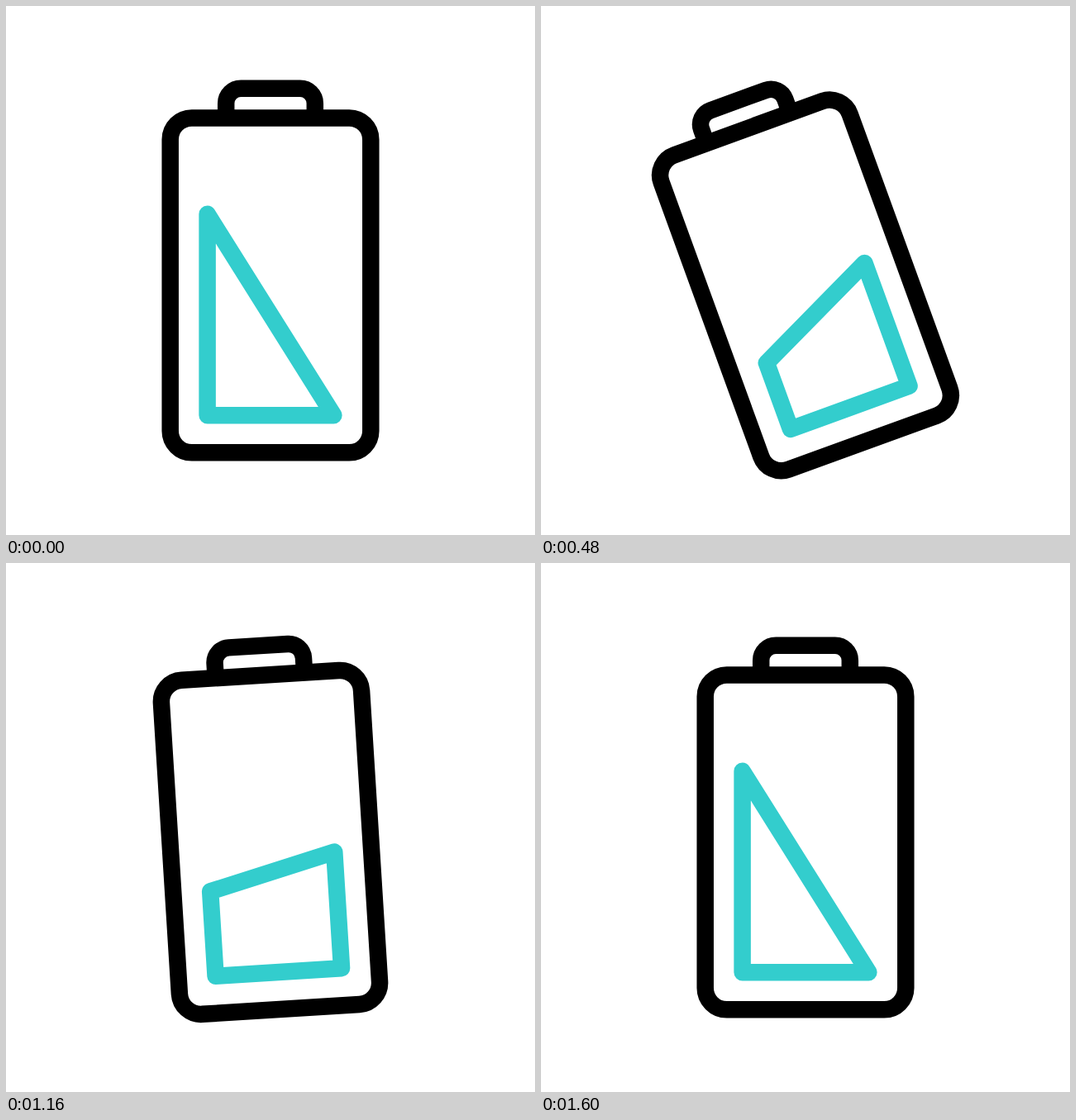
Animation, 640 px wide and 640 px high, one loop 1620 ms. Source, as an HTML page:

```html
<!DOCTYPE html>
<html lang="en">
<head>
<meta charset="utf-8">
<title>Battery</title>
<style>
  html, body { margin: 0; width: 100%; height: 100%; overflow: hidden; background: #fff; }
  svg { display: block; width: 100%; height: 100%; }
  path, rect { fill: none; stroke: #000; stroke-width: 20.5; }
  #liquid { stroke: #33cdcd; stroke-linejoin: round; }
</style>
</head>
<body>
<svg viewBox="0 0 640 640">
  <g id="battery">
    <path d="M266.2 130V117.7a18 18 0 0 1 18-18h71.6a18 18 0 0 1 18 18V130"/>
    <rect x="198.7" y="135.5" width="242.6" height="404.8" rx="26"/>
    <path id="liquid"/>
  </g>
</svg>
<script>
const LOOP = 1620;
const battery = document.getElementById('battery');
const liquid = document.getElementById('liquid');

// [time in ms, value]
const tilt = [[0, 0], [115, 0], [484, -20], [786, 5], [1278, -5], [1600, 0]];
const slosh = [[0, 1], [800, 0], [1607, 1]];

function valueAt(keys, t) {
  for (let i = 1; i < keys.length; i++) {
    const [t0, a] = keys[i - 1], [t1, b] = keys[i];
    if (t < t1) {
      const x = (t - t0) / (t1 - t0);
      return a + (b - a) * x * x * (3 - 2 * x);
    }
  }
  return keys[keys.length - 1][1];
}

function draw(t) {
  const left = 243.6, right = 396.4, floor = 495.3, rise = 243.5;
  const s = valueAt(slosh, t);
  const yLeft = floor - rise * s;
  const yRight = floor - rise * (1 - s);
  liquid.setAttribute('d', `M${left} ${floor}V${yLeft}L${right} ${yRight}V${floor}Z`);
  battery.setAttribute('transform', `rotate(${valueAt(tilt, t)} 320 338)`);
}

const start = performance.now();
function tick() {
  draw((performance.now() - start) % LOOP);
  requestAnimationFrame(tick);
}
draw(0);
requestAnimationFrame(tick);
</script>
</body>
</html>
```
